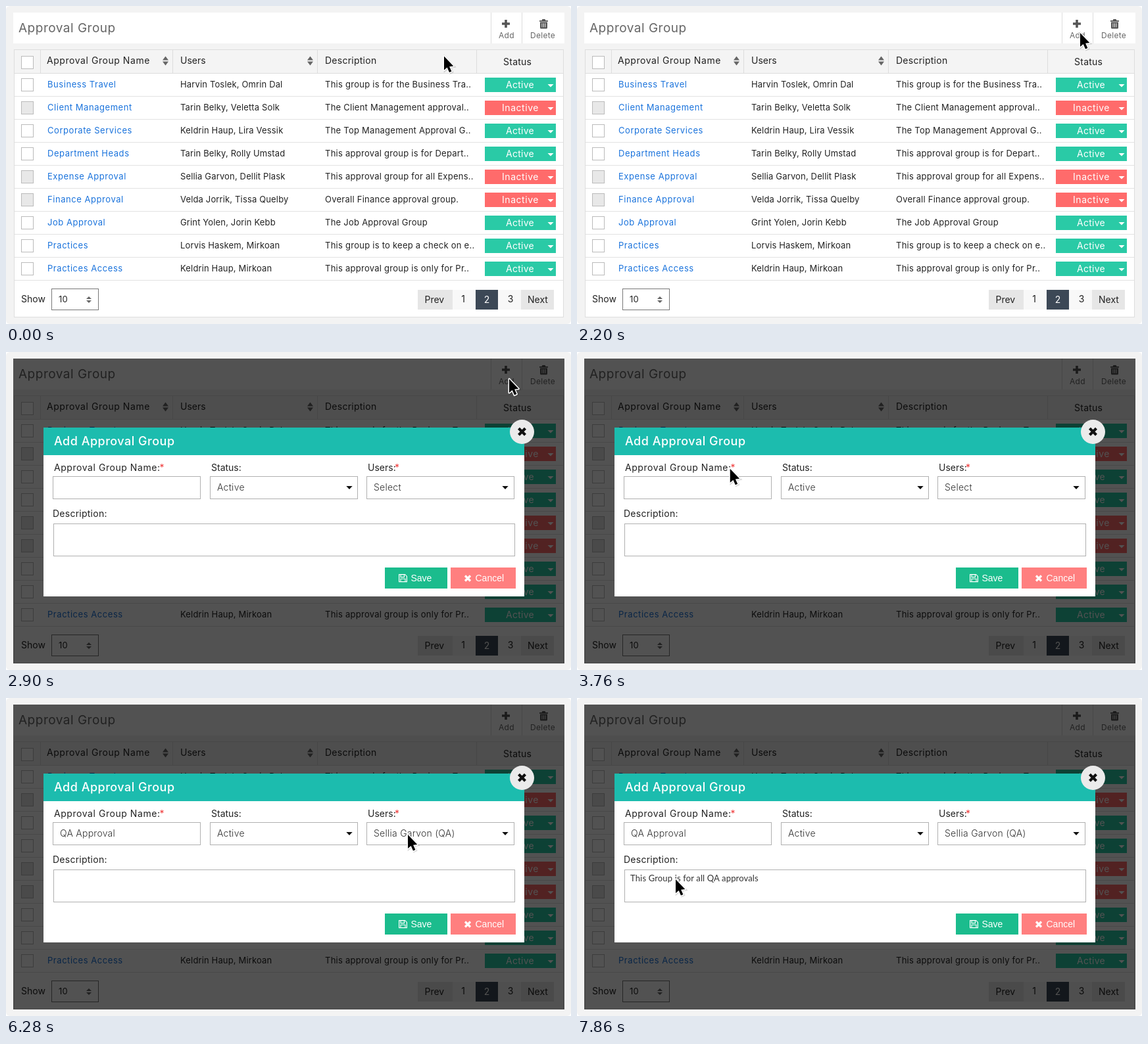
Recreate the animation shown at these times as an HTML page. Size 859 by 484 pixels, loop 8000 ms.

```html
<!DOCTYPE html>
<html lang="en">
<head>
<meta charset="utf-8">
<title>Approval groups</title>
<style>
html, body { margin: 0; width: 100%; height: 100%; overflow: hidden; background: #fff; }
svg { display: block; width: 859px; height: 484px; }
text { font: 14px Inter, Roboto, sans-serif; fill: #222; white-space: pre; }
.light { font-weight: 300; fill: #333; }
.row { font-size: 13px; letter-spacing: .15px; }
.about { font-size: 13px; letter-spacing: .25px; }
.link { font-size: 13px; letter-spacing: .55px; fill: #1a73dc; }
.tool { font-size: 12px; letter-spacing: .3px; fill: #666; }
.title { font-size: 19px; letter-spacing: .5px; fill: #666; }
.wide { letter-spacing: .55px; }
.mid { letter-spacing: .25px; }
.white { fill: #fff; }
.heading { font-size: 18px; font-weight: 500; letter-spacing: .5px; fill: #fff; }
.button { font-family: "Liberation Sans", Arial, sans-serif; fill: #fff; }
.note { font: 13px Lato, "Open Sans", sans-serif; letter-spacing: .15px; fill: #333; }
.center { text-anchor: middle; }
</style>
</head>
<body>
<svg id="stage" viewBox="0 0 859 484" xmlns="http://www.w3.org/2000/svg"></svg>
<script>
const stage = document.getElementById('stage');
let parent = stage;

function el(tag, attrs, content) {
  const node = document.createElementNS(stage.namespaceURI, tag);
  for (const key in attrs) node.setAttribute(key, attrs[key]);
  if (content !== undefined) node.textContent = content;
  return parent.appendChild(node);
}
const rect = (x, y, width, height, fill, more) => el('rect', { x, y, width, height, fill, ...more });
const box = (x, y, w, h, stroke, fill = '#fff') => rect(x + .5, y + .5, w - 1, h - 1, fill, { stroke });
const text = (x, y, str, cls = '') => el('text', { x, y, class: cls }, str);
const path = (d, fill, more) => el('path', { d, fill, ...more });
const line = (d, stroke, width = 1) => path(d, 'none', { stroke, 'stroke-width': width });
const caret = (x, y, r, h, fill) => path(`M${x - r} ${y}h${2 * r}l${-r} ${h}z`, fill);

function group(draw, host = stage) {
  const outer = parent;
  parent = host;
  const g = parent = el('g', {});
  draw();
  parent = outer;
  return g;
}
function sorter(x, y, r, h) {
  caret(x, y - 1, r, -h, '#666');
  caret(x, y + 1, r, h, '#666');
}
function cross(x, y, r, width, color) {
  line(`M${x - r} ${y - r}L${x + r} ${y + r}M${x + r} ${y - r}L${x - r} ${y + r}`, color, width);
}

const rows = [
  ['Business Travel', 'Harvin Toslek, Omrin Dal', 'This group is for the Business Tra..', 1],
  ['Client Management', 'Tarin Belky, Veletta Solk', 'The Client Management approval..', 0],
  ['Corporate Services', 'Keldrin Haup, Lira Vessik', 'The Top Management Approval G..', 1],
  ['Department Heads', 'Tarin Belky, Rolly Umstad', 'This approval group is for Depart..', 1],
  ['Expense Approval', 'Sellia Garvon, Dellit Plask', 'This approval group for all Expens..', 0],
  ['Finance Approval', 'Velda Jorrik, Tissa Quelby', 'Overall Finance approval group.', 0],
  ['Job Approval', 'Grint Yolen, Jorin Kebb', 'The Job Approval Group', 1],
  ['Practices', 'Lorvis Haskem, Mirkoan', 'This group is to keep a check on e..', 1],
  ['Practices Access', 'Keldrin Haup, Mirkoan', 'This approval group is only for Pr..', 1]
];

let addParts;

function drawToolbar() {
  rect(11, 10, 838, 47, '#fff');
  line('M737.5 10V57M784.5 10V57', '#ddd');
  text(19, 40, 'Approval Group', 'title');
  addParts = [
    path('M758.2 21h3.6v4.2h4.2v3.6h-4.2v4.2h-3.6v-4.2h-4.2v-3.6h4.2z', '#555'),
    text(749, 49, 'Add', 'tool')
  ];
  text(797, 49, 'Delete', 'tool');
  path('M811 22h3.5l1-2h4l1 2h3.5v1.8h-13zM812 24.6h11v8.4q0 1.5-1.5 1.5h-8q-1.5 0-1.5-1.5z', '#555');
  line('M815 26.3v6M817.5 26.3v6M820 26.3v6', '#fff', .9);
}

function drawTable() {
  box(12, 66, 836, 408, '#ddd');
  rect(13, 67, 834, 35, '#f4f4f4');
  line('M13 102.5H847M52.5 67V102M253.5 67V102M473.5 67V102M715.5 67V102', '#ddd');
  box(23, 76, 19, 20, '#bbb');
  text(62, 88, 'Approval Group Name', 'wide');
  text(265, 88, 'Users');
  text(485, 88, 'Description', 'mid');
  text(756, 90, 'Status', 'mid');
  sorter(242.5, 83.5, 4.5, 6);
  sorter(462.5, 83.5, 4.5, 6);

  rows.forEach(([name, users, about, active], i) => {
    const y = 102 + 35 * i;
    box(23, y + 8, 19, 20, '#bbb', active ? '#fff' : '#e8e8e8');
    text(63, y + 22, name, 'link');
    text(265, y + 22, users, 'row');
    text(485, y + 22, about, 'about');
    rect(728, y + 7, 108, 22, active ? '#2acaa6' : '#ff6b6b');
    text(active ? 760 : 754, y + 23, active ? 'Active' : 'Inactive', 'white ' + (active ? 'mid' : 'wide'));
    caret(828, y + 17, 4.5, 4.5, '#fff');
    line(`M13 ${y + 35.5}H847`, '#e2e2e2');
  });
}

function drawFooter() {
  text(23, 451, 'Show');
  box(69, 430, 72, 33, '#777');
  text(80, 451, '10', 'row');
  sorter(126, 447, 4, 4);
  rect(626, 432, 53, 30, '#e6e6e6');
  rect(679, 432, 104, 30, '#f8f8f8');
  rect(714, 432, 34, 30, '#3c4856');
  rect(783, 432, 50, 30, '#e6e6e6');
  text(636.5, 452, 'Prev');
  text(695, 451, '1', 'center');
  text(731, 452, '2', 'center white');
  text(767, 451, '3', 'center');
  text(793, 452, 'Next');
}

let nameText, userText, noteText;

function drawDialog() {
  rect(57, 115, 731, 257, '#fff');
  rect(57, 115, 731, 42, '#1cbcae');
  text(73, 142, 'Add Approval Group', 'heading');
  el('circle', { cx: 784.5, cy: 121.5, r: 18.5, fill: '#ebebeb' });
  cross(784.5, 121.3, 5, 4.2, '#111');

  text(73, 181, 'Approval Group Name:', 'wide');
  text(312, 181, 'Status:');
  text(550, 181, 'Users:');
  text(71, 251, 'Description:', 'mid');
  for (const x of [233.5, 591]) text(x, 181, '*').style.fill = '#f03a3a';

  for (const x of [71, 310, 548]) box(x, 189, 225, 35, '#b0b0b0');
  box(72, 261, 702, 50, '#b0b0b0');
  caret(522, 204, 4.7, 5, '#111');
  caret(759, 204, 4.7, 5, '#111');
  nameText = text(82, 211, 'QA Approval', 'light mid');
  text(321, 211, 'Active', 'light mid');
  userText = text(559, 211, 'Select', 'light mid');
  noteText = text(81, 279, 'This Group is for all QA approvals', 'note');

  rect(576, 328, 95, 32, '#1bbc8d');
  rect(676, 328, 99, 32, '#ff7f7f');
  path('M597.6 338.6h9l2.8 2.8v8.2h-11.8z', 'none', { stroke: '#fff', 'stroke-width': 1.2 });
  path('M600 338.6h5.5v4h-5.5zM600 349.5v-4.2h7v4.2', 'none', { stroke: '#fff', 'stroke-width': 1.1 });
  text(615.5, 349, 'Save', 'button');
  cross(702, 344.5, 4, 3.2, '#fff');
  text(713.5, 349, 'Cancel', 'button');
}

rect(0, 0, 859, 484, '#f3f3f3', { rx: 6 });
group(() => { drawToolbar(); drawTable(); drawFooter(); });
const shade = rect(11, 10, 838, 464, '#000', { opacity: .68 });
const dialog = group(drawDialog);
const ring = el('circle', { fill: 'none', stroke: '#777', 'stroke-width': 1.2 });
const cursor = group(() => {
  const arrow = 'M0 0V21L4.7 17L8 24.6L11.4 23.1L8.1 15.8L14.3 15z';
  path(arrow, '#000', { opacity: .15, transform: 'translate(1.2 1)', stroke: '#000', 'stroke-width': 3 });
  path(arrow, '#000', { stroke: '#fff', 'stroke-width': 3, 'stroke-linejoin': 'round', 'paint-order': 'stroke' });
});

const LOOP = 8000, TICK = 40;
const home = [666, 76.5];
// start time, number of ticks, destination
const moves = [
  [1000, 6, 765, 41],
  [3440, 11, 114.5, 208],
  [5100, 9, 611, 208],
  [6720, 9, 150, 276]
];
const clicks = [4340, 5920, 7540];

function cursorAt(t) {
  let [x, y] = home;
  for (const [start, ticks, toX, toY] of moves) {
    if (t < start) break;
    const k = Math.min(1, (Math.floor((t - start) / TICK) + 1) / ticks);
    x += (toX - x) * k;
    y += (toY - y) * k;
  }
  return [x, y];
}
const show = (node, on) => node.setAttribute('visibility', on ? 'inherit' : 'hidden');

function render(t) {
  const [x, y] = cursorAt(t);
  cursor.setAttribute('transform', `translate(${x} ${y})`);

  const hover = t >= 1700 && t < 2200;
  addParts[0].style.fill = hover ? '#1cbcae' : '#555';
  addParts[1].style.fill = hover ? '#1cbcae' : '#666';

  show(shade, t >= 2700);
  show(dialog, t >= 2900);
  show(nameText, t >= 4660);
  show(noteText, t >= 7860);
  const user = t >= 6280 ? 'Sellia Garvon (QA)' : 'Select';
  if (userText.textContent !== user) userText.textContent = user;

  const click = clicks.find(c => t >= c && t < c + 3 * TICK);
  show(ring, click !== undefined);
  if (click !== undefined) {
    ring.setAttribute('cx', x);
    ring.setAttribute('cy', y + .5);
    ring.setAttribute('r', 2.5 + 2 * Math.floor((t - click) / TICK));
  }
}

function frame() {
  render(performance.now() % LOOP);
  requestAnimationFrame(frame);
}
frame();
</script>
</body>
</html>
```
